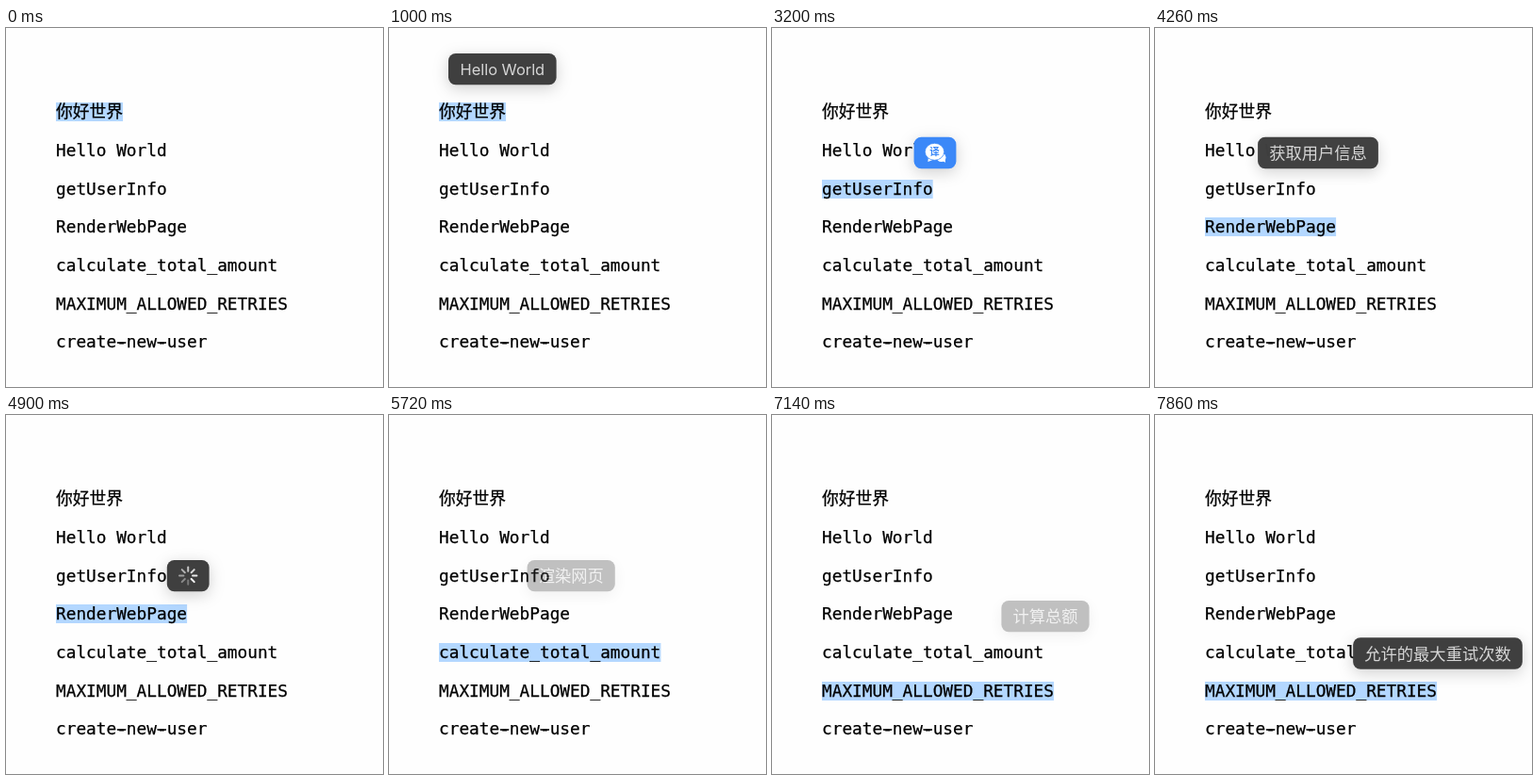
These frames come from a looping animation (400x381 px, 8 s). An HTML page:

```html
<!DOCTYPE html>
<html lang="en">
<head>
<meta charset="utf-8">
<title>Translate selection</title>
<style>
  html, body { margin: 0; width: 100%; height: 100%; overflow: hidden; background: #fefefe; }
  svg { display: block; width: 100%; height: 100%; }
  .code { font: 17.77px "DejaVu Sans Mono", "Noto Sans CJK SC", "Noto Sans CJK", monospace; white-space: pre; stroke: #000; stroke-width: .25px; }
  .latin { font: 16.4px Inter, sans-serif; }
  .cjk { font: 17.3px "Noto Sans CJK SC", "Noto Sans CJK", sans-serif; }
  .glyph { font: 700 10.5px "Noto Sans CJK SC", "Noto Sans CJK", sans-serif; }
  #popup { filter: drop-shadow(0 4px 8px rgba(0, 0, 0, .18)); }
</style>
</head>
<body>
<svg id="stage" viewBox="0 0 400 381">
  <rect width="400" height="381" fill="#fefefe"/>
  <rect id="mark" x="53" height="20" fill="#b3d7ff"/>
  <g id="lines" class="code"></g>
  <g id="popup">
    <rect id="panel" y="-16.7" height="33.4" rx="7.8"/>
    <g id="icon">
      <ellipse cx="6.6" cy="5" rx="4.9" ry="4.5" fill="#fff"/>
      <path d="M7 8 L11 10.2 L10.4 5Z" fill="#fff"/>
      <g id="bubble" fill="#fff" stroke-width=".8">
        <path d="M-7 4 L-7.6 9.6 L-1 7Z" stroke="none"/>
        <ellipse cx="-.5" cy="-1.2" rx="10.2" ry="9"/>
      </g>
      <text id="glyph" class="glyph" x="-.5" y="2.7" text-anchor="middle">译</text>
    </g>
    <g id="spinner" stroke="#fff" stroke-width="2" stroke-linecap="round"></g>
    <text id="result" text-anchor="middle" fill="#d6d6d6"></text>
  </g>
</svg>
<script>
const NS = "http://www.w3.org/2000/svg";
const LOOP = 8000, SPOKES = 8;
const DARK = "#3f3f3f", BLUE = "#3b88f8";
const $ = id => document.getElementById(id);
const clamp = v => Math.max(0, Math.min(1, v));
const ramp = (t, a, b) => clamp((t - a) / (b - a));

function set(el, attrs) {
  for (const k in attrs) el.setAttribute(k, attrs[k]);
  return el;
}
function add(parent, tag, attrs, text) {
  const el = set(document.createElementNS(NS, tag), attrs);
  if (text) el.textContent = text;
  return parent.appendChild(el);
}

// start: popup cycle begins; ready: delay until the translation shows
const steps = [
  { text: "你好世界", out: "Hello World", w: 114.6, x: 120.3, y: 43.6, start: 200, ready: 760 },
  { text: "Hello World", out: "你好世界", x: 173, y: 86.6, start: 1500, ready: 770 },
  { text: "getUserInfo", out: "获取用户信息", x: 173, y: 132.5, start: 3000, ready: 720 },
  { text: "RenderWebPage", out: "渲染网页", x: 193.2, y: 170.6, start: 4260, ready: 770 },
  { text: "calculate_total_amount", out: "计算总额", x: 290, y: 213.6, start: 5680, ready: 830 },
  { text: "MAXIMUM_ALLOWED_RETRIES", out: "允许的最大重试次数", x: 300, y: 253, start: 7100, ready: 720 },
  { text: "create-new-user" }
];
const baseline = i => Math.round(95.4 + 40.65 * i);

steps.forEach((s, i) => {
  add($("lines"), "text", { x: 53, y: baseline(i) }, s.text);
  s.markW = s.text.length * (i ? 10.7 : 17.77);
  if (s.out && !s.w) s.w = s.out.length * 17.3 + 24;
});
// wide hyphens in the last line
for (const col of [6, 10])
  add($("lines"), "rect", { x: 53 + col * 10.7 + .8, y: baseline(6) - 5.7, width: 9.1, height: 1.5 });

const spokes = Array.from({ length: SPOKES }, (_, i) =>
  add($("spinner"), "line", { x1: 4.8, x2: 9.2, y1: 0, y2: 0, transform: `rotate(${i * 360 / SPOKES})` }));

function popup(step, mode, opacity) {
  set($("popup"), { opacity, transform: `translate(${step.x} ${step.y})` });
  const isIcon = mode === "dark" || mode === "blue";
  const fill = mode === "blue" ? BLUE : DARK;
  const w = mode === "result" ? step.w : 44.8;
  set($("panel"), { x: -w / 2, width: w, fill });
  set($("icon"), { visibility: isIcon ? "visible" : "hidden" });
  set($("bubble"), { stroke: fill });
  set($("glyph"), { fill });
  set($("spinner"), { visibility: mode === "spin" ? "visible" : "hidden" });
  const latin = step === steps[0];
  const r = set($("result"), {
    visibility: mode === "result" ? "visible" : "hidden",
    class: latin ? "latin" : "cjk",
    y: latin ? 6.2 : 6.5
  });
  if (r.textContent !== step.out) r.textContent = step.out;
}

function spin(t) {
  const head = 1 + Math.floor((t - 640) / 100);
  spokes.forEach((el, i) => {
    const age = (head - i + SPOKES) % SPOKES;
    set(el, { "stroke-opacity": 1 - age * .1 });
  });
}

function draw(time) {
  let n = 0;
  while (n < 5 && time >= steps[n + 1].start) n++;
  const step = steps[n], t = time - step.start;
  set($("mark"), { y: baseline(n) - 16, width: step.markW });

  if (t < 60 && n) popup(steps[n - 1], "result", 1 - ramp(t, 0, 60));
  else if (t < 160) popup(step, "dark", ramp(t, 60, 150));
  else if (t < 330) popup(step, "blue", 1);
  else if (t < 600) popup(step, "dark", 1 - ramp(t, 360, 540));
  else if (t < step.ready) {
    popup(step, "spin", ramp(t, 600, 640));
    spin(t);
  } else popup(step, "result", 1);
}

const origin = performance.now();
function tick() {
  draw((performance.now() - origin) % LOOP);
  requestAnimationFrame(tick);
}
tick();
</script>
</body>
</html>
```
